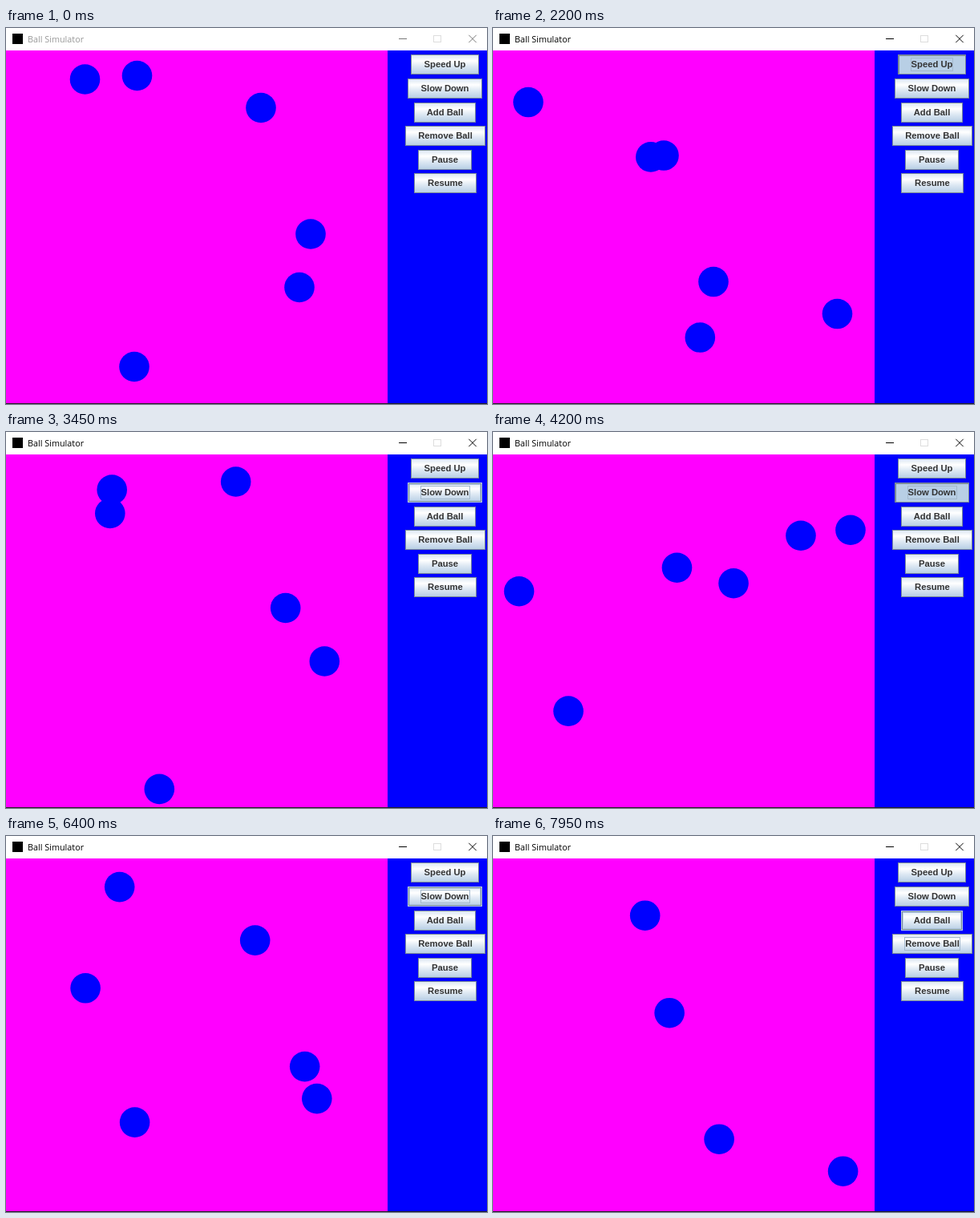
Write an HTML page that moves like this. It is 600 by 469 pixels and loops after 8000 ms.

```html
<!DOCTYPE html>
<html lang="en">
<head>
<meta charset="utf-8">
<title>Ball Simulator</title>
<style>
  html, body { margin: 0; width: 100%; height: 100%; overflow: hidden; background: #fff; }
  #stage { position: relative; width: 600px; height: 469px; overflow: hidden; }
  svg { position: absolute; left: 0; top: 0; }
  .title { font: 10.8px "Open Sans", "Noto Sans", sans-serif; }
  .button {
    position: absolute; height: 25px; box-sizing: border-box;
    border: 1px solid #7a8a99;
    background: linear-gradient(#dde8f3, #fff 30%, #dde8f3 60%, #b8cfe5);
    display: flex; align-items: center; justify-content: center;
    font: bold 11.25px "Liberation Sans", Arial, sans-serif;
    color: #333; white-space: nowrap;
  }
  .button span { padding: 1px 0; line-height: 13px; outline: 1px solid transparent; }
  .focus span { outline-color: #a3b8cc; }
  .hover {
    border-color: #b8cfe5;
    box-shadow: inset 0 0 0 1px #7a8a99, inset 0 0 0 2px #b8cfe5;
  }
  .pressed { background: #b8cfe5; border-color: #7a8a99; box-shadow: inset 1px 1px #7a8a99; }
</style>
</head>
<body>
<div id="stage">
  <svg width="600" height="469">
    <rect width="600" height="28" fill="#fff"/>
    <rect x="8" y="7" width="13" height="13"/>
    <text id="caption" class="title" x="27" y="18">Ball Simulator</text>
    <g id="controls" fill="none">
      <path d="M490 13.5h10"/>
      <path d="M577.3 8.8l9.4 9.4m0-9.4l-9.4 9.4"/>
    </g>
    <rect x="533.5" y="9.5" width="9" height="8" fill="none" stroke="#ddd"/>
    <rect y="28" width="476" height="441" fill="#f0f"/>
    <g id="balls" fill="#00f"></g>
    <rect x="476" y="28" width="124" height="441" fill="#00f"/>
    <rect y="468" width="600" height="1" fill="#222"/>
  </svg>
</div>
<script>
const LOOP = 8000, STEP = 50, RADIUS = 18.8;
const WALLS = { left: 17.4, right: 457.5, top: 47, bottom: 452.7 };

// [time, distance travelled]: every ball shares one speed, changed by clicks
const TRAVEL = [
  [0, 0], [950, 92.5], [1877, 227.8], [2250, 336.6], [3350, 819.5],
  [3500, 863.6], [3800, 907.4], [4250, 951], [6150, 1089.9], [8000, 1198]
];

// start position, direction, time of removal
const BALLS = [
  { x: 98.5, y: 64, dx: -1, dy: 1, end: 7500 },
  { x: 163.5, y: 59.5, dx: 1, dy: -1 },
  { x: 318, y: 99.5, dx: 1, dy: -1 },
  { x: 380, y: 257, dx: 1, dy: -1 },
  { x: 366, y: 323.5, dx: -1, dy: -1, end: 7000 },
  { x: 160, y: 422.5, dx: -1, dy: 1 }
];

const BUTTONS = [
  { label: 'Speed Up', width: 85, hover: [[400, 2600]], focus: [900, 3250],
    press: [[900, 1150], [1750, 1880], [2100, 2250]] },
  { label: 'Slow Down', width: 93, hover: [[2700, 4450], [5400, 6500]], focus: [3250, 6900],
    press: [[3250, 3350], [3700, 3800], [4150, 4250], [6050, 6150]] },
  { label: 'Add Ball', width: 77, hover: [[4550, 4650], [5300, 5350], [6550, 6600], [7750, 8000]] },
  { label: 'Remove Ball', width: 100, hover: [[4700, 5250], [6650, 7700]], focus: [6900, 8000],
    press: [[6900, 7000], [7400, 7500]] },
  { label: 'Pause', width: 67 },
  { label: 'Resume', width: 78 }
];

const byId = id => document.getElementById(id);
const within = (t, [from, to]) => t >= from && t < to;
const during = (t, spans = []) => spans.some(span => within(t, span));

function travelled(t) {
  const i = TRAVEL.findIndex(([time]) => time > t);
  const [t0, s0] = TRAVEL[i - 1], [t1, s1] = TRAVEL[i];
  return s0 + (s1 - s0) * (t - t0) / (t1 - t0);
}

// reflects an unbounded position between two walls
function bounce(p, low, high) {
  const size = high - low, period = 2 * size;
  const phase = ((p - low) % period + period) % period;
  return low + size - Math.abs(size - phase);
}

for (const ball of BALLS) {
  ball.node = document.createElementNS('http://www.w3.org/2000/svg', 'circle');
  ball.node.setAttribute('r', RADIUS);
  byId('balls').append(ball.node);
}

BUTTONS.forEach((button, i) => {
  const node = button.node = document.createElement('div');
  const text = document.createElement('span');
  text.textContent = button.label;
  node.append(text);
  node.style.left = Math.round(547.5 - button.width / 2) + 'px';
  node.style.top = Math.round(33.4 + i * 29.6) + 'px';
  node.style.width = button.width + 'px';
  byId('stage').append(node);
});

function draw(t) {
  const s = travelled(t), active = t >= 900;
  for (const { node, x, y, dx, dy, end = LOOP } of BALLS) {
    node.setAttribute('cx', bounce(x + dx * s, WALLS.left, WALLS.right));
    node.setAttribute('cy', bounce(y + dy * s, WALLS.top, WALLS.bottom));
    node.style.display = t < end ? '' : 'none';
  }
  for (const { node, hover, focus, press } of BUTTONS) {
    node.className = 'button';
    node.classList.toggle('hover', during(t, hover));
    node.classList.toggle('pressed', during(t, press));
    node.classList.toggle('focus', !!focus && within(t, focus));
  }
  byId('caption').setAttribute('fill', active ? '#000' : '#999');
  byId('controls').setAttribute('stroke', active ? '#000' : '#777');
}

const start = performance.now();
function tick() {
  const t = (performance.now() - start) % LOOP;
  draw(Math.floor(t / STEP) * STEP);
  requestAnimationFrame(tick);
}
tick();
</script>
</body>
</html>
```
